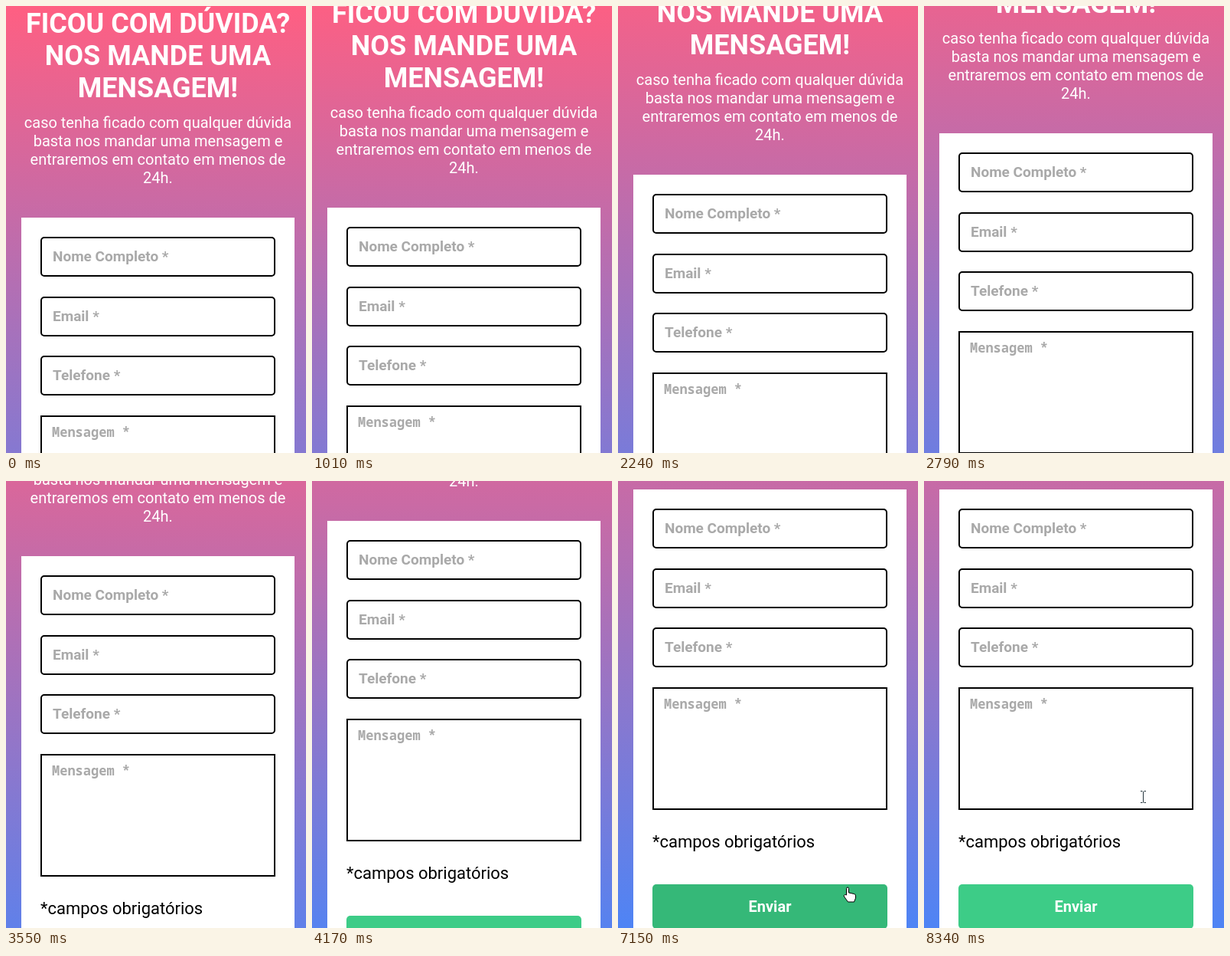
An HTML page for the animation above (8540 ms loop, 392 by 583 pixels).

```html
<!DOCTYPE html>
<html lang="pt-BR">
<head>
<meta charset="utf-8">
<title>Formulário de contato</title>
<style>
  html, body { margin: 0; width: 100%; height: 100%; overflow: hidden; }
  body { position: relative; font-family: Roboto, sans-serif; }
  #page {
    position: absolute; left: 0; top: 0; width: 392px; height: 900px;
    background: linear-gradient(rgb(255,95,130), rgb(78,132,245) 848px);
  }
  #page > * { position: absolute; box-sizing: border-box; margin: 0; white-space: nowrap; }
  h1, .intro { left: 0; width: 397px; text-align: center; color: #fff; }
  h1 { top: 2px; font: 700 36px/42px Roboto, sans-serif; }
  .intro { top: 140px; font-size: 20px; line-height: 24px; }
  .card { left: 20px; top: 276px; width: 357px; height: 624px; background: #fff; }
  .field, .area {
    left: 45px; width: 307px; height: 52px; padding-left: 14px;
    border: 2px solid #000; border-radius: 5px; background: #fff;
    color: #a9a9a9; font-weight: 700; font-size: 19px; line-height: 48px;
  }
  .area {
    top: 534px; height: 160px; padding: 7px 0 0 13px; border-radius: 0;
    font: 700 17px/26px "Noto Sans Mono", monospace;
  }
  .note { left: 45px; top: 723px; font-size: 22px; line-height: 26px; color: #000; }
  .send {
    left: 45px; top: 791px; width: 307px; height: 58px; border-radius: 5px;
    background: #3dcc87; color: #fff; text-align: center;
    font-weight: 700; font-size: 20px; line-height: 58px;
  }
  .send.hover { background: #35b878; }
  #cursor { position: absolute; left: 0; top: 0; overflow: visible; }
  #cursor path { display: none; }
  #cursor path.on { display: inline; }
</style>
</head>
<body>
<div id="page">
  <h1>FICOU COM DÚVIDA?<br>NOS MANDE UMA<br>MENSAGEM!</h1>
  <p class="intro">caso tenha ficado com qualquer dúvida<br>basta nos mandar uma mensagem e<br>entraremos em contato em menos de<br>24h.</p>
  <div class="card"></div>
  <div class="field" style="top:301px">Nome Completo *</div>
  <div class="field" style="top:379px">Email *</div>
  <div class="field" style="top:456px">Telefone *</div>
  <div class="area">Mensagem *</div>
  <div class="note">*campos obrigatórios</div>
  <div class="send">Enviar</div>
</div>
<svg id="cursor" width="1" height="1">
  <path id="arrow" d="M.5 .5v16l3.7-3.5 2.4 5.5 2.4-1-2.4-5.4h5z" fill="#fff" stroke="#000"/>
  <path id="beam" d="M-3 -7.5h2.5M1.5 -7.5h2.5M.5 -7v14.5M-3 7.5h2.5M1.5 7.5h2.5" fill="none" stroke="#24343c"/>
  <path id="hand" d="M-1.5 10V1.5a1.5 1.5 0 0 1 3 0V7l7 1.5q2 .5 2 2.500v3l-2 5h-8l-5-7q-1-2 1-2.500z" fill="#fff" stroke="#000"/>
</svg>
<script>
  const LOOP = 8540;
  const $ = s => document.querySelector(s);
  const page = $('#page'), send = $('.send'), cursor = $('#cursor');
  const shapes = ['arrow', 'beam', 'hand'].map(id => $('#' + id));

  // [time, scroll]
  const scroll = [
    [670, 0], [900, 11], [1150, 23], [1350, 30], [1499, 34],
    [1760, 34], [1899, 36], [2031, 36], [2790, 110], [3550, 178], [4170, 224],
    [4500, 243], [4780, 256], [4990, 264], [5400, 264], [5469, 265]
  ];
  // [time, x, y]
  const pointer = [
    [6660, 377, 344], [6950, 345, 440], [7150, 300, 530], [7500, 242, 556],
    [7700, 250, 558], [7900, 270, 530], [8150, 285, 450], [8340, 286, 412]
  ];

  // Motion advances in short discrete steps counted from the latest start.
  function snap(t, starts, step) {
    const s = starts.filter(v => v <= t).pop() || 0;
    return s ? s + Math.floor((t - s) / step) * step : 0;
  }

  function at(track, t, col) {
    const i = track.findIndex(k => k[0] > t);
    if (i === 0) return track[0][col];
    if (i < 0) return track[track.length - 1][col];
    const a = track[i - 1], b = track[i];
    return Math.round(a[col] + (b[col] - a[col]) * (t - a[0]) / (b[0] - a[0]));
  }

  function draw() {
    const t = performance.now() % LOOP;
    const y = at(scroll, snap(t, [740, 1830, 2100, 5470], 69), 1);
    page.style.transform = `translateY(${-y}px)`;

    const shown = t >= 6660;
    const ct = snap(t, [6660], 70);
    const cx = at(pointer, ct, 1), cy = at(pointer, ct, 2);
    const inside = cx >= 45 && cx < 352;
    const overSend = shown && inside && cy >= 526;
    const kind = overSend ? 'hand' : inside && cy < 429 ? 'beam' : 'arrow';
    cursor.style.transform = `translate(${cx}px, ${cy}px)`;
    shapes.forEach(s => s.classList.toggle('on', shown && s.id === kind));
    send.classList.toggle('hover', overSend);
    requestAnimationFrame(draw);
  }
  draw();
</script>
</body>
</html>
```
